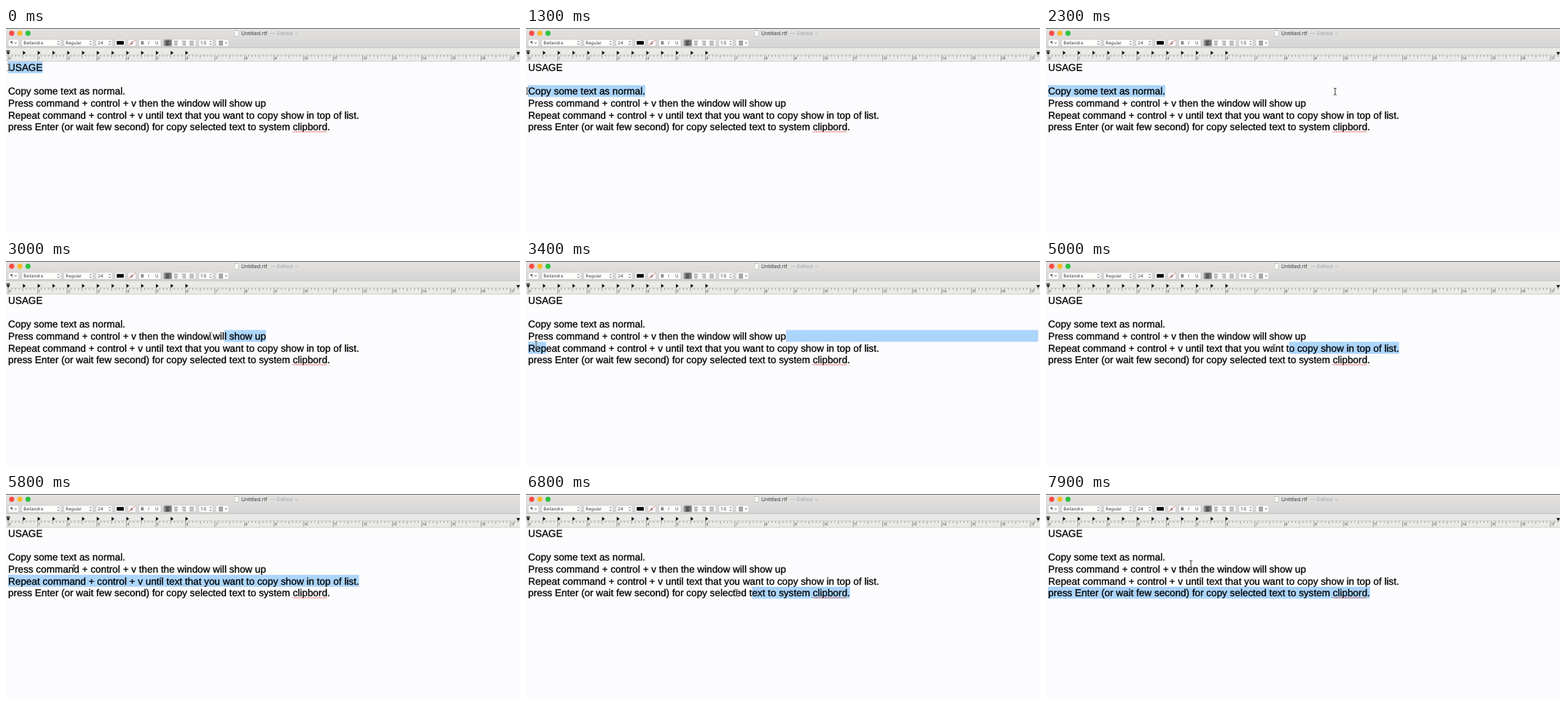
Write an HTML page with a canvas that moves like this. It is 720 by 287 pixels and loops after 8 s.

```html
<!DOCTYPE html>
<html lang="en">
<head>
<meta charset="utf-8">
<title>Text editor selection</title>
<style>
html, body { margin: 0; width: 100%; height: 100%; overflow: hidden; background: #fcfcfe; }
canvas { display: block; }
</style>
</head>
<body>
<canvas id="stage" width="720" height="287"></canvas>
<script>
const c = document.getElementById('stage').getContext('2d');
c.textRendering = 'geometricPrecision';

const LOOP = 8000, LEFT = 3, RIGHT = 717.5, TOP = 46.6, LEADING = 16.65, INCH = 41.4;
const BODY = '13.8px "Liberation Sans", Arial, sans-serif';
const UI = 'Inter, Roboto, sans-serif';
const INK = '#3c3c3c', BLACK = '#080808', PALE = '#a4a4a4';
const lines = [
  'USAGE', '', 'Copy some text as normal.',
  'Press command + control + v then the window will show up',
  'Repeat command + control + v until text that you want to copy show in top of list.',
  'press Enter (or wait few second) for copy selected text to system clipbord.'
];

// --- Drawing helpers
function rect(x, y, w, h, color) {
  c.fillStyle = color;
  c.fillRect(x, y, w, h);
}
function text(s, x, y, size, color = INK, style = '') {
  c.font = `${style} ${size}px ${UI}`;
  c.fillStyle = color;
  c.fillText(s, x, y);
}
function line(points, color, width = .8) {
  c.strokeStyle = color;
  c.lineWidth = width;
  c.beginPath();
  points.forEach(([x, y]) => c.lineTo(x, y));
  c.stroke();
}
function triangle(x, y, angle) {
  c.save();
  c.translate(x, y);
  c.rotate(angle);
  c.fillStyle = BLACK;
  c.beginPath();
  c.moveTo(-2, -2.7);
  c.lineTo(2, 0);
  c.lineTo(-2, 2.7);
  c.fill();
  c.restore();
}
function pill(x, w, color = '#fdfdfc') {
  c.fillStyle = color;
  c.strokeStyle = '#c6c5c2';
  c.lineWidth = .6;
  c.beginPath();
  c.roundRect(x, 16, w, 9.5, 2);
  c.fill();
  c.stroke();
}
function chevron(x, y, h = 1.6, color = INK) {
  line([[x - 1.5, y - h / 2], [x, y + h / 2], [x + 1.5, y - h / 2]], color);
}
function bars(x, width, color, align = 0) {
  for (let i = 0; i < 4; i++) {
    const w = i % 2 ? width : 6;
    rect(x + (6 - w) * align, 18 + i * 1.8, w, .8, color);
  }
}

// --- Window chrome
function drawTitle() {
  const g = c.createLinearGradient(0, 0, 0, 28);
  g.addColorStop(0, '#e4e3e2');
  g.addColorStop(1, '#d5d4d4');
  rect(0, 0, 720, 28, g);
  rect(0, 0, 720, 1, '#66655c');
  ['#fc4b45', '#fcb825', '#2cc440'].forEach((color, i) => {
    c.fillStyle = color;
    c.beginPath();
    c.arc(8 + i * 11.4, 7.3, 3.6, 0, 7);
    c.fill();
  });
  rect(320, 3.5, 6, 8, '#aaa9a5');
  rect(320.5, 4, 5, 7, '#fdfdfb');
  text('Untitled.rtf', 329.5, 10, 7.3);
  text('— Edited', 370.5, 10, 7.3, PALE);
  chevron(407, 7.7, 1.6, PALE);
}

const field = label => (x, w) => {
  text(label, x + 2.5, 23, 6.2);
  chevron(x + w - 3.5, 19, -1.5);
  chevron(x + w - 3.5, 22.6);
};

// Each control is its width and what it shows; they flow left to right
const controls = [
  [15, x => { text('¶', x + 3, 23, 6.3); chevron(x + 10.5, 20.8); }],
  [55, field('Bellandra')],
  [41, field('Regular')],
  [23, field('24')],
  [14, x => rect(x + 2, 18.2, 10, 5.2, BLACK)],
  [11, x => { text('a', x + 3, 23, 6.5); line([[x + 1, 24.5], [x + 10, 17]], '#d84a36'); }],
  [31, x => ['bold', 'italic', ''].forEach((style, i) => text('BIU'[i], x + 3 + i * 10, 23, 6.2, INK, style))],
  [45, x => {
    pill(x, 11.5, '#858585');
    for (let i = 0; i < 4; i++) bars(x + 3 + i * 11, i < 3 ? 4 : 6, i ? '#777' : '#222', i / 2);
  }],
  [20, field('1.0')],
  [18, x => { bars(x + 4, 6, INK); chevron(x + 14.5, 20.8); }]
];

function drawToolbar() {
  let x = LEFT;
  for (const [w, draw] of controls) {
    pill(x, w);
    draw(x, w);
    x += w + 4;
  }
}

function drawRuler() {
  rect(0, 28, 720, 18.6, '#e9e9e7');
  for (const y of [27.5, 37.5, 46]) rect(0, y, 720, .6, '#bcbbb7');
  for (let i = 0; i <= 138; i++) {
    const h = i % 8 === 0 ? 8 : i % 4 === 0 ? 4 : 2.3;
    rect(LEFT + i * INCH / 8 - .3, 38, .6, h, '#6b6b68');
  }
  for (let i = 0; i <= 17; i++) text(i, LEFT + i * INCH + 1, 44.3, 5);
  for (let i = 1; i <= 12; i++) triangle(LEFT + i * INCH / 2 + 2, 34.7, 0);
  rect(.5, 31.4, 5, 1.2, BLACK);
  triangle(LEFT, 35.5, Math.PI / 2);
  triangle(RIGHT, 35.8, Math.PI / 2);
}

// --- Pointer: each line is dragged from its end to its start
const edge = (row, n) => {
  c.font = BODY;
  return LEFT + c.measureText(lines[row].slice(0, n)).width;
};
const middle = row => TOP + (row + .5) * LEADING;
const ease = k => k * k * (3 - 2 * k);

// Where the pointer roams after each drag: time, x, y
const roam = [[2300, 405, 89], [4100, 55, 105], [5800, 95, 104], [7900, 203, 98]];
const drags = roam.map((stop, i) => {
  const row = i + 2, start = 963 + 1832 * i, from = edge(row) + 1;
  return { row, start, from, end: start + from * 1.87, sag: row === 3 ? 13 : 0 };
});
const keys = [[0, 4, 55]];
drags.forEach((d, i) => keys.push(
  [d.start - 50, d.from, middle(d.row)], [d.start, d.from, middle(d.row)],
  [d.end, 1, middle(d.row)], roam[i]
));
keys.push([LOOP, ...roam[3].slice(1)]);

function pointer(t) {
  const i = Math.max(1, keys.findIndex(key => key[0] >= t));
  const [t0, x0, y0] = keys[i - 1], [t1, x1, y1] = keys[i];
  const k = (t - t0) / (t1 - t0), e = ease(k);
  const drag = drags.find(d => t > d.start && t < d.end);
  const sag = drag ? drag.sag * Math.sin(Math.PI * k ** 4) : 0;
  return [x0 + (x1 - x0) * e, y0 + (y1 - y0) * e + sag];
}

function drawPointer(t) {
  const [x, y] = pointer(t);
  for (const [color, width] of [['#ffffffb0', 2], ['#222', .9]]) {
    line([[x, y - 4], [x, y + 4]], color, width);
    for (const s of [-1, 1]) line([[x - 2, y + 5 * s], [x, y + 4 * s], [x + 2, y + 5 * s]], color, width);
  }
}

// --- Document
function hit([x, y]) {
  const row = Math.min(5, Math.floor((y - TOP) / LEADING));
  let best = 0;
  for (let n = 1; n <= lines[row].length; n++)
    if (Math.abs(edge(row, n) - x) < Math.abs(edge(row, best) - x)) best = n;
  return [row, best];
}

function drawSelection(t) {
  const drag = drags.findLast(d => d.start <= t) || { row: 0, start: 0, end: 0 };
  // The highlight trails the pointer slightly
  const focus = hit(pointer(Math.max(drag.start, Math.min(t - 28, drag.end))));
  const anchor = [drag.row, lines[drag.row].length];
  const [[r0, n0], [r1, n1]] = [anchor, focus].sort((a, b) => a[0] - b[0] || a[1] - b[1]);
  for (let r = r0; r <= r1; r++) {
    const x0 = r === r0 ? edge(r, n0) : LEFT;
    const x1 = r === r1 ? edge(r, n1) : RIGHT;
    rect(x0, TOP + r * LEADING, x1 - x0, LEADING, '#acd5fb');
  }
}

function drawBody(t) {
  drawSelection(t);
  c.font = BODY;
  c.fillStyle = c.strokeStyle = '#000';
  c.lineWidth = .3;
  lines.forEach((s, i) => {
    c.fillText(s, LEFT, 60 + i * LEADING);
    c.strokeText(s, LEFT, 60 + i * LEADING);
  });
  for (let x = 401.5; x < 449; x += 2.3) rect(x, 144.7, 1.3, 1.2, '#f0493c');
}

const began = performance.now();
function frame() {
  const t = Math.floor((performance.now() - began) % LOOP / 100) * 100;
  rect(0, 0, 720, 287, '#fcfcfe');
  drawTitle();
  drawToolbar();
  drawRuler();
  drawBody(t);
  drawPointer(t);
  requestAnimationFrame(frame);
}
frame();
</script>
</body>
</html>
```
